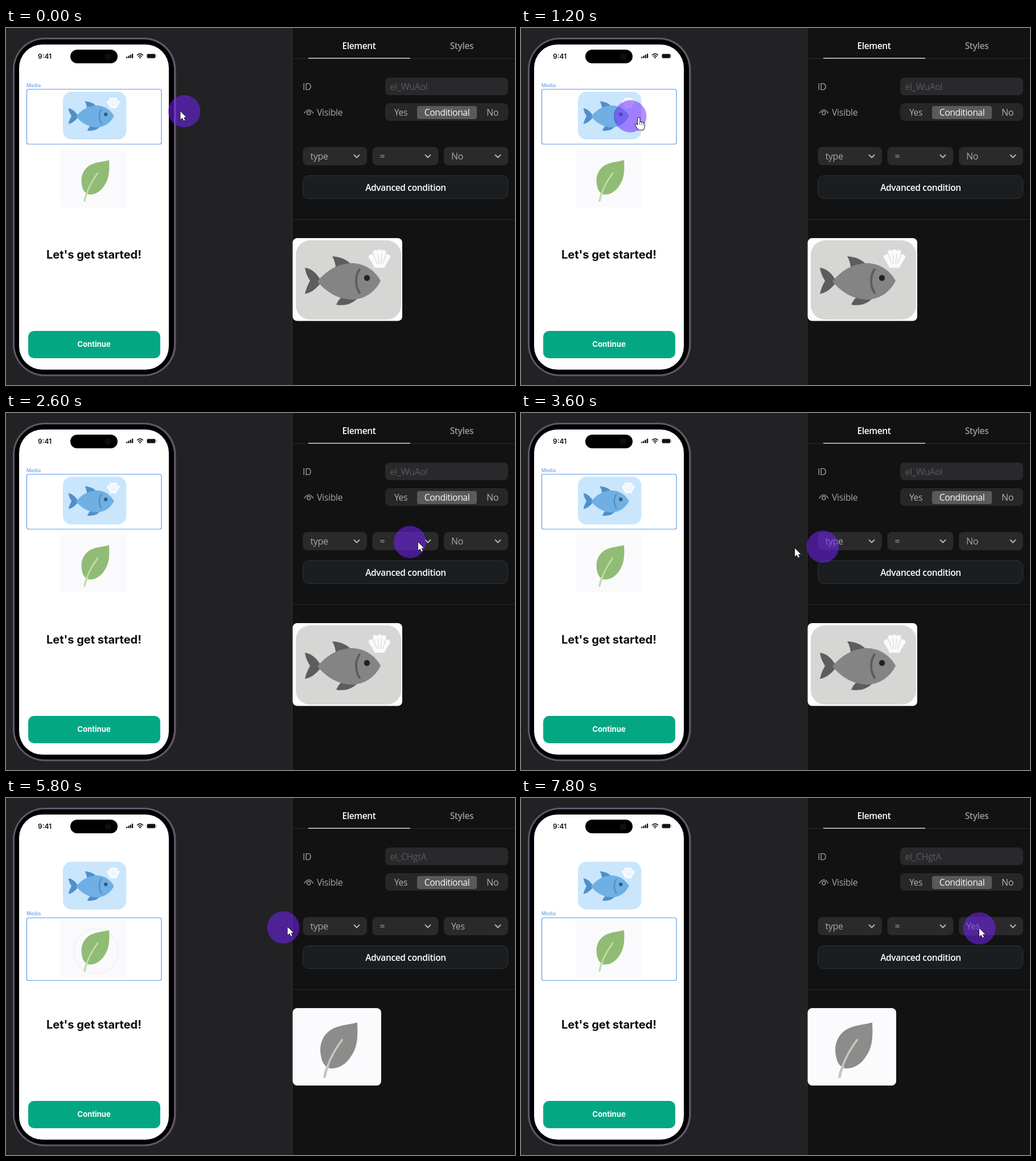
An HTML page with a canvas for the animation above (8400 ms loop, 894 by 627 pixels).

```html
<!DOCTYPE html>
<html lang="en">
<head>
<meta charset="utf-8">
<title>Conditional media</title>
<style>
html, body { margin: 0; width: 100%; height: 100%; overflow: hidden; background: #222224; }
canvas { display: block; }
</style>
</head>
<body>
<canvas id="stage" width="894" height="627"></canvas>
<script>
const ctx = document.getElementById('stage').getContext('2d');
const LOOP = 8400, STEP = 200, LAG = 41;
const PICK = 4800, HOVER = 4200;
const UI = '"Open Sans", "Noto Sans", sans-serif';
const APP = 'Inter, Roboto, sans-serif';

// Pointer moves: start, end, from x/y, to x/y, sideways bend in y
const moves = [
  [-100, 500, 317, 146, 174, 152, 0],
  [1050, 1855, 174, 152, 536, 215, 0],
  [1950, 2350, 536, 215, 690, 226, 0],
  [2450, 2850, 690, 226, 797, 229, 0],
  [3203, 4003, 797, 229, 158, 270, -11.5],
  [5000, 5850, 158, 270, 498, 226, 0],
  [5950, 6350, 498, 226, 575, 228, 0],
  [6450, 7000, 575, 228, 805, 229, 0]
];

const clamp = v => Math.max(0, Math.min(1, v));
const ease = u => u * u * (3 - 2 * u);

function pointer(t) {
  let m = moves[0];
  for (const next of moves) if (t >= next[0]) m = next;
  const [t0, t1, x0, y0, x1, y1, bend] = m;
  const u = clamp((t - t0) / (t1 - t0)), s = ease(u);
  return [x0 + (x1 - x0) * s, y0 + (y1 - y0) * s + bend * Math.sin(Math.PI * u)];
}

function box(x, y, w, h, r, fill, stroke, width = 1) {
  ctx.beginPath();
  ctx.roundRect(x, y, w, h, r);
  if (fill) { ctx.fillStyle = fill; ctx.fill(); }
  if (stroke) { ctx.strokeStyle = stroke; ctx.lineWidth = width; ctx.stroke(); }
}

function disc(x, y, r, fill) {
  ctx.beginPath();
  ctx.arc(x, y, r, 0, Math.PI * 2);
  ctx.fillStyle = fill;
  ctx.fill();
}

function text(str, x, y, size, color, weight = 400, family = UI, align = 'left') {
  ctx.font = `${weight} ${size}px ${family}`;
  ctx.letterSpacing = family === UI ? '-0.35px' : '0px';
  ctx.textAlign = align;
  ctx.fillStyle = color;
  ctx.fillText(str, x, y);
}

function shape(d, fill) {
  ctx.fillStyle = fill;
  ctx.fill(new Path2D(d));
}

function line(d, color, width) {
  ctx.strokeStyle = color;
  ctx.lineWidth = width;
  ctx.lineCap = ctx.lineJoin = 'round';
  ctx.stroke(new Path2D(d));
}

function placed(x, y, scale, draw) {
  ctx.save();
  ctx.translate(x, y);
  ctx.scale(scale, scale);
  draw();
  ctx.restore();
}

function shell(color, gap) {
  shape('M131 28 L138 20 L156 20 L163 28 L156 48 L138 48Z', color);
  line('M141 43 L132 29 M144 42 L139.5 21 M147 42 V20 M150 42 L154.5 21 M153 43 L162 29', color, 8);
  line('M136 24 L142.5 41 M144.5 24 L145.5 41 M151 24 L149 41 M158.5 24 L152.5 41', gap, 1.1);
}

function fish(x, y, scale, c) {
  placed(x, y, scale, () => {
    box(0, 0, 185, 139, 25, c.card);
    shape('M64 28 C79 29 91 34 99 44 L70 54 C71 44 68 35 64 28Z', c.dark);
    shape('M71 113 C75 104 80 99 86 96 L111 99 C101 111 87 116 71 113Z', c.dark);
    shape('M16 48 C29 50 36 58 42 67 L42 77 C34 86 27 92 16 94 C18 85 21 78 25 71 C20 63 17 56 16 48Z', c.dark);
    shape('M38 72 C56 50 78 40 100 40 C122 41 139 53 149 71 C139 91 121 103 100 104 C77 104 55 93 38 72Z', c.body);
    line('M112 51 C104 62 104 80 112 92', c.dark, 4);
    disc(125, 66, 5.2, c.eye);
    shell(c.hat, c.card);
  });
}

function leaf(x, y, scale, fill, vein) {
  placed(x, y, scale, () => {
    shape('M85 19 C86 36 85.5 50 78.5 61 C71 74 61 80 50 79.5 C43 78.5 38.5 71 37.5 64 '
      + 'C34.5 50 38 38 49 29.5 C60 22 73 22.5 85 19Z', fill);
    line('M42 90.5 Q47 66 65 42', vein, 2.7);
    line('M42 90.5 Q43 84 46 77', vein, 3.6);
  });
}

function phone(picked, hover) {
  box(12, 17, 286.5, 594.5, 56, '#605769');
  box(15, 20, 280, 588.5, 53, '#000');
  box(23, 29, 263, 571, 41, '#fff');

  text('9:41', 56, 54, 12, '#111', 600, APP);
  box(113, 38, 83, 24, 12, '#000');
  disc(179.5, 50, 6, '#0d0d12');
  for (let i = 0; i < 4; i++) box(211 + i * 3.3, 50.5 - i * 1.8, 2.3, 2.5 + i * 1.8, 0.7, '#111');
  line('M230.5 47.5 Q235.5 43.3 240.5 47.5 M232.6 49.8 Q235.5 47.6 238.4 49.8', '#111', 1.5);
  disc(235.5, 52, 1.3, '#111');
  box(247.5, 45.5, 15, 7.5, 2, '#111', '#999', 0.8);
  box(264, 47.5, 1, 3, 0.5, '#999');

  fish(100, 112, 0.602, {
    card: '#c9e6fd', body: '#70afe3', dark: '#508fc8', eye: '#30597f', hat: '#f7fbff'
  });
  box(96, 213, 116, 102, 0, '#fafafd');
  leaf(96, 213, 1, '#91bc75', '#c1dfa9');

  const blue = '#5c9ae6';
  if (!picked) box(36.5, 107.5, 236.5, 96.5, 3, null, blue, 1.2);
  if (picked || hover) box(36.5, 210.5, 236.5, 110, 3, null, blue, 1.2);
  text('Media', 36, picked ? 206 : 104, 8.5, '#69a5e8', 500, APP);

  text("Let's get started!", 154.5, 405, 20, '#0b0b0c', 700, APP, 'center');
  box(39, 532, 232, 48, 10, '#04a784');
  text('Continue', 154.5, 560, 13.2, '#fff', 700, APP, 'center');
}

function select(x, w, label, arrowX) {
  box(x, 209, w, 32, 8, '#2a2a2c');
  text(label, x + 13, 231, 16, '#a8a8ab');
  line(`M${arrowX - 4.5} 223 l4.5 4.5 l4.5 -4.5`, '#bcbcbf', 1.8);
}

function panel(picked) {
  ctx.fillStyle = '#121213';
  ctx.fillRect(503, 0, 391, 627);
  ctx.fillStyle = '#343437';
  ctx.fillRect(502, 0, 1, 627);
  ctx.fillStyle = '#2b2b2d';
  ctx.fillRect(503, 53, 391, 1);
  ctx.fillRect(503, 336, 391, 1);
  ctx.fillStyle = '#f0f0f0';
  ctx.fillRect(531, 52.5, 179, 1.3);

  text('Element', 620, 37, 15.5, '#fff', 600, UI, 'center');
  text('Styles', 800.5, 37, 15.5, '#98989b', 600, UI, 'center');

  text('ID', 521, 109, 16, '#a5a5a8');
  box(666, 87, 216, 31, 8, '#29292b');
  text(picked ? 'el_CHgtA' : 'el_WuAol', 674.5, 109, 16, '#59595c');

  line('M524 149.5 Q531.8 138 539.5 149.5', '#98989b', 1.4);
  ctx.beginPath();
  ctx.arc(531.8, 149.5, 3, 0, Math.PI * 2);
  ctx.stroke();
  text('Visible', 546, 154, 15.9, '#a5a5a8');
  box(666, 132, 216, 31, 8, '#252729');
  box(722, 137, 105, 23, 4, '#5a5a5c');
  text('Yes', 693.5, 154, 15.6, '#b0b0b3', 400, UI, 'center');
  text('Conditional', 774.5, 154, 15.6, '#fafafa', 400, UI, 'center');
  text('No', 854.5, 154, 16, '#b0b0b3', 400, UI, 'center');

  select(521.5, 112.5, 'type', 616);
  select(643.5, 116, '=', 741);
  select(769, 113, picked ? 'Yes' : 'No', 864);

  box(521.5, 259.5, 360, 40, 10, '#1a1e20', '#303437');
  text('Advanced condition', 702, 286, 15.5, '#fff', 600, UI, 'center');

  if (picked) {
    box(503.5, 369, 155.5, 136, 8, '#fbfbfd');
    leaf(503.5, 369, 1.334, '#8c8c8a', '#c6c6c5');
  } else {
    box(503.5, 369, 192.5, 145.5, 8, '#fdfdfd');
    fish(509, 373, 1, {
      card: '#d6d6d4', body: '#848484', dark: '#5d5d5d', eye: '#222', hat: '#fafafa'
    });
  }
}

function ripple(t) {
  const age = t - PICK;
  if (age < 0 || age > 1200) return;
  const grow = clamp(age / STEP);
  const alpha = age < STEP ? 0.85 : Math.max(0.05, 0.25 - (age - STEP) / 1000);
  ctx.beginPath();
  ctx.arc(158, 269, 4 + 35 * grow, 0, Math.PI * 2);
  ctx.strokeStyle = `rgba(${age > STEP ? '110,100,130' : '95,15,225'},${alpha})`;
  ctx.lineWidth = 4 - 2 * grow;
  ctx.stroke();
}

function cursor(x, y) {
  const hand = x < 273;
  const d = hand
    ? 'M-2 1.5 C-2 -0.7 1.5 -0.7 1.5 1.5 L1.5 8 C2.5 6.7 4.4 7 4.7 8.5 C5.8 7.5 7.5 8 7.7 9.5 '
      + 'C9 9 10 9.9 10 11.2 L9.6 16 L7.8 21 L-0.5 21 L-6 13.5 C-7 11.8 -5 10.6 -3.8 11.8 L-2 13.6Z'
    : 'M0 0 L0 14.2 L3.4 11.2 L5.7 16.2 L8 15.2 L5.8 10.4 L10.2 10.2Z';
  placed(x, y, 1, () => {
    line(d, '#161616', hand ? 2 : 1.6);
    shape(d, '#fff');
    if (hand) line('M1.5 8 V12 M4.7 9 V12.4 M7.6 10 V12.8', '#333', 0.8);
  });
}

function draw(now) {
  const t = Math.floor((now % LOOP) / STEP) * STEP;
  const picked = t >= PICK;
  ctx.fillStyle = '#222224';
  ctx.fillRect(0, 0, 894, 627);
  phone(picked, t >= HOVER);
  panel(picked);
  const [cx, cy] = pointer(t - LAG);
  disc(cx, cy, 28.3, 'rgba(119,36,255,0.52)');
  ripple(t);
  cursor(...pointer(t));
}

const start = performance.now();
function tick() {
  draw(performance.now() - start);
  requestAnimationFrame(tick);
}
tick();
</script>
</body>
</html>
```
